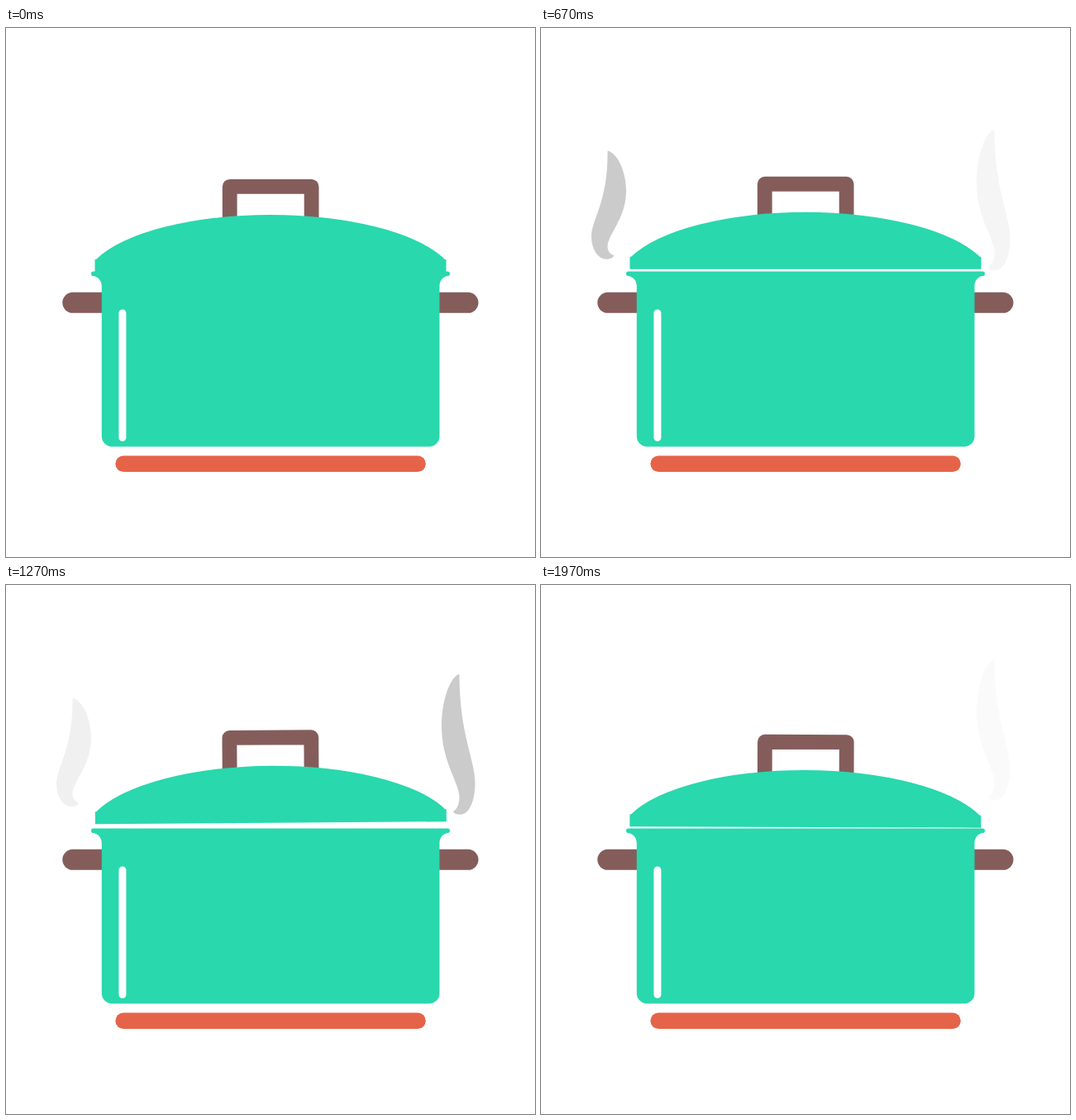
Recreate the animation shown at these times as an HTML page. Size 640 by 640 pixels, loop 2010 ms.

```html
<!DOCTYPE html>
<html lang="en">
<head>
<meta charset="utf-8">
<title>Cooking pot</title>
<style>
  html, body { margin: 0; width: 100%; height: 100%; overflow: hidden; background: #fff; }
  svg { display: block; width: 100%; height: 100%; }
  .pot { fill: #29d8ad; }
  .grip { fill: #845d5b; }
  .steam { fill: #cbcbcb; }
</style>
</head>
<body>
<svg viewBox="0 0 640 640">
  <path id="left" class="steam" opacity="0" d="M81.5 152.5C94 157 103 179 103 201C103 234 80.500 254 80.500 268C80.500 274 84 277.500 88.500 279C87 282 83 283.500 79 283.500C69 283.500 61 271 61 256C61 236 81 214 80.500 155Q80.300 152 81.500 152.500Z"/>
  <path id="right" class="steam" opacity="0" d="M547.500 119C536 125 527 153 527 182C527 226 548.500 250 548.500 268C548.500 277 545 283.500 541 285C542 288 545 289 550 289C560 289 567.500 273 567.500 251C567.500 222 549 194 548.500 121Q548.500 118.500 547.500 119Z"/>
  <g id="lid">
    <path d="M270.700 240V191.900H369.600V240" fill="none" stroke="#845d5b" stroke-width="17.800" stroke-linejoin="round"/>
    <path class="pot" d="M107.500 295V280H109A225 82.700 0 0 1 531 280H532.500V295Z"/>
  </g>
  <rect class="grip" x="68.300" y="319.800" width="70" height="25" rx="12.500"/>
  <rect class="grip" x="501.500" y="319.800" width="70" height="25" rx="12.500"/>
  <path class="pot" d="M105.800 294.500H534.200A2.800 2.800 0 0 1 534.200 300.100C528.500 301 524.500 306 524.500 312V494A12.500 12.500 0 0 1 512 506.500H128.300A12.500 12.500 0 0 1 115.800 494V312C115.800 306 111.500 301 105.800 300.100A2.800 2.800 0 0 1 105.800 294.500Z"/>
  <rect x="136.400" y="340.500" width="9" height="159.500" rx="4.500" fill="#fff"/>
  <rect x="132.400" y="517.500" width="375.400" height="19.500" rx="9.750" fill="#e56349"/>
</svg>
<script>
  const LOOP = 2010;
  const FADE = 405;

  // Each hop: start, end, lift in px, tilt in degrees, tilt start
  const hops = [
    [160, 780, 6, 0, 160],
    [780, 1400, 12, -0.6, 780],
    [1400, 2010, 10, 0.6, 1425]
  ];

  // Rise is in px per ms, measured from the time the path is drawn for
  const steams = [
    { id: 'left', start: 0, end: 1390, drawn: 470, rise: 0.0192 },
    { id: 'right', start: 590, end: 2010, drawn: 830, rise: 0.0254 }
  ];

  const byId = id => document.getElementById(id);
  const clamp = v => Math.max(0, Math.min(1, v));
  const arc = (t, a, b) => Math.max(0, Math.sin(Math.PI * clamp((t - a) / (b - a))));

  function draw(t) {
    let lift = 0, tilt = 0;
    for (const [start, end, height, angle, tiltStart] of hops) {
      lift += height * arc(t, start, end);
      tilt += angle * Math.pow(arc(t, tiltStart, end), 0.8);
    }
    byId('lid').setAttribute('transform', `translate(0 ${-lift}) rotate(${tilt} 320 239)`);

    for (const { id, start, end, drawn, rise } of steams) {
      const el = byId(id);
      el.setAttribute('opacity', clamp(Math.min(t - start, end - t) / FADE));
      el.setAttribute('transform', `translate(0 ${(drawn - t) * rise})`);
    }
  }

  const begin = performance.now();
  function tick() {
    draw((performance.now() - begin) % LOOP);
    requestAnimationFrame(tick);
  }
  tick();
</script>
</body>
</html>
```
